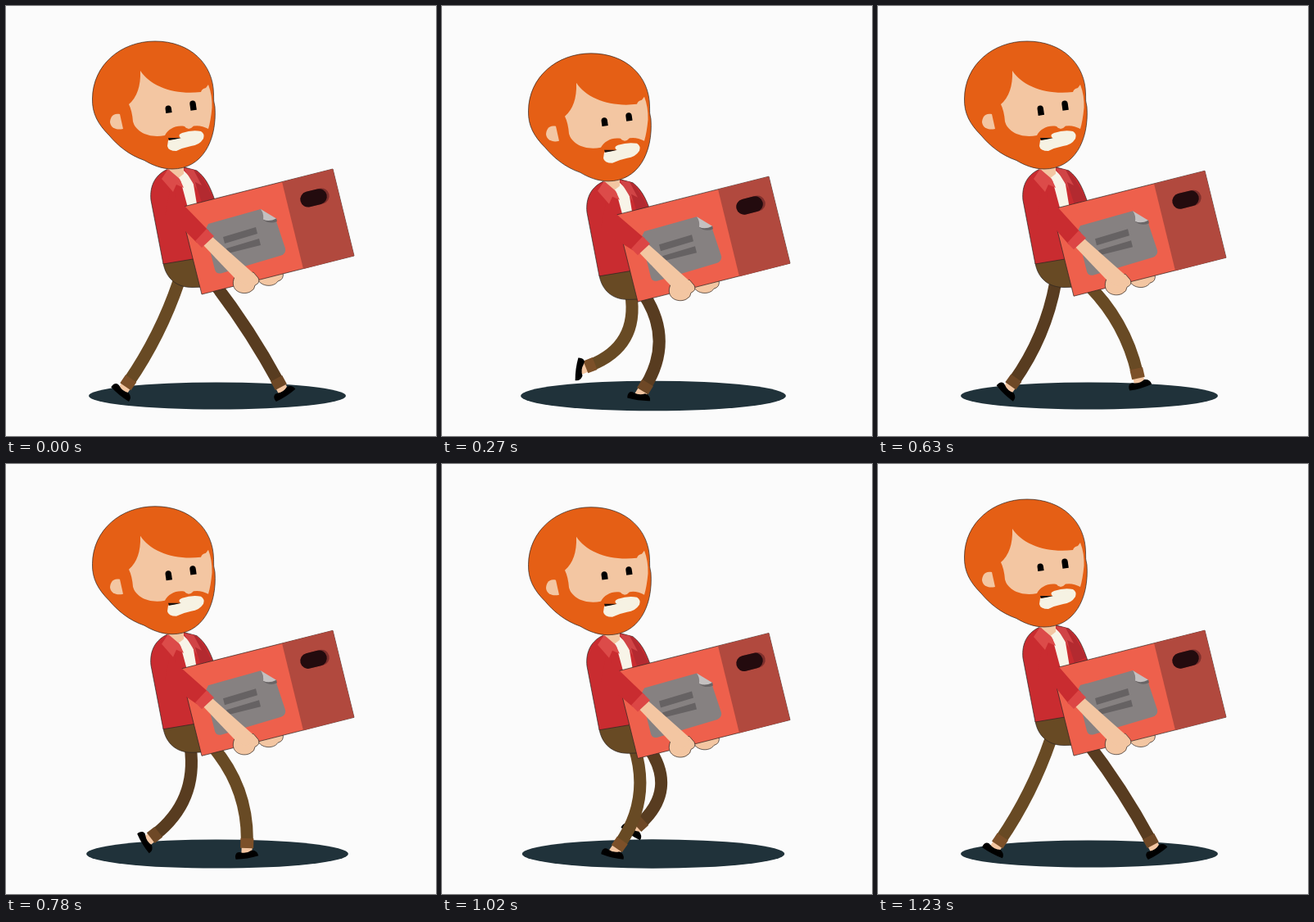
Animation of 525 by 525 pixels, one loop 1260 ms. Source, as an HTML page:

```html
<!DOCTYPE html>
<html lang="en">
<head>
<meta charset="utf-8">
<title>Carrying a box</title>
<style>
  html, body { margin: 0; width: 100%; height: 100%; overflow: hidden; background: #fbfbfb; }
  svg { display: block; width: 100vw; height: 100vh; }
  .edge { stroke: #2b2422; stroke-width: .7; }
  .skin { fill: #f3c6a2; }
  .red { fill: #c92c30; }
  .thigh { fill: none; stroke-width: 15; }
</style>
</head>
<body>
<svg viewBox="0 0 525 525">
  <ellipse id="shadow" cx="258" cy="476" fill="#20323a"/>
  <g id="farLeg"></g>
  <g id="nearLeg"></g>

  <g id="torso">
    <path class="edge" fill="#684a24" d="M192 314C195 331 207 344 228 343.5L246 343L240 305Z"/>
    <path class="red edge" d="M198 199C183 205 175 219 177 237L192 315L240 307L256 240C251 226 246 211 233 201L218 197Z"/>
    <path fill="#f8f4e8" d="M210 208L217 201L228 212L234 248L222 249Z"/>
    <path class="skin" d="M196 194H217V205L208 212L198 204Z"/>
    <path class="red" d="M205 214L213 213L223 250L210 252Z"/>
    <path fill="#dc4b49" d="M198 199L190 211L204 227L208 218L217 222L212 211Z"/>
    <path fill="#b32a30" d="M217 198L230 200C241 208 246 222 254 236L240 243L232 218Z"/>
    <path fill="#d04446" d="M217 198L229 200L239 219L231 215L233 224Z"/>
  </g>

  <g class="load">
    <path class="skin edge" d="M307 333C311 343 327 344 332 336Q340 334 338 325L308 325Z"/>
    <path class="edge" fill="#ee604c" d="M212.5 246L399 199L425 305L239 352Z"/>
    <path fill="#b1493e" d="M337 214.7L399 199L425 305L363 321Z"/>
    <g transform="rotate(-14 377 234)">
      <rect x="360" y="224.5" width="35" height="19" rx="9.5" fill="#7d2f2c"/>
      <rect x="359" y="224.5" width="33" height="19" rx="9.5" fill="#230b0e"/>
    </g>
    <path fill="#868181" d="M247 266L311 248L329 260L341 296Q342 302 336 304.5L264 326Q257 328 255 322L243 274Z"/>
    <path fill="#696566" d="M330 259L331 263Q322 267 314 261Z"/>
    <path fill="#c4c0c0" d="M311 248L330 259.5Q321 264 314 260.5Q315 253 311 248Z"/>
    <path fill="#666263" d="M265 282L305 270L307 278L267 290ZM269 296L309 284L311 292L271 302Z"/>
  </g>

  <path id="sleeve" class="red"/>
  <g class="load">
    <path class="edge" fill="#f3c6a2" d="M279 331C272 347 288 354 298 349Q304 346 304 341Q311 338 308 332L302 325Z"/>
    <path class="skin" d="M251 281L301 325.5Q305 338 291 340L280 333L240 291Z"/>
    <path fill="#dc4645" d="M245 272L254 281L239 295L231 287Z"/>
  </g>

  <g id="head">
    <path class="edge" fill="#e55f15" d="M182 43C225 43 253.5 71 253.5 108Q253 116 255 123C258 165 239 199 203 199C190 199 178 194 169 188.5C150 182 136 170 126 158C112 144 105 131 105.5 113C106 72 140 43 182 43Z"/>
    <path class="skin" d="M164 79C176 98 206 109 238 105Q239 101 244 100L247 96Q252 109 251.5 124Q250 140 247 150Q238 145 229 146.5Q226 150 223 150Q219 149 218 147C208 145 198 150 194 158C174 162 158 153 155 141Q154 128 150 120Q165 107 164 79Z"/>
    <path class="skin" d="M139 132C130 130 127 137 127 142C128 149 135 152 143 150Z"/>
    <path fill="#f6f2e3" d="M198 164L213 161Q209 157 215 155Q227 151 238 153Q243 156 241 162Q236 170 226 171Q216 173 208 177Q198 177 197 171Z"/>
    <path fill="#15100e" d="M198 161L214 161Q206 163 199 164Z"/>
    <path id="eyeL"/>
    <path id="eyeR"/>
  </g>
</svg>
<script>
const LOOP = 1260, STEP = 30, TAU = 2 * Math.PI;
const $ = id => document.getElementById(id);
const clamp = (v, lo = 0, hi = 1) => Math.min(hi, Math.max(lo, v));
const mix = (a, b, u) => a + (b - a) * u;
const smooth = u => u * u * (3 - 2 * u);

const move = (el, x, y, deg = 0) =>
  el.setAttribute('transform', `translate(${x} ${y}) rotate(${deg})`);

// Ease from 0 to 1 between a and b, then back to 0 at c.
const pulse = (t, a, b, c, back = smooth) =>
  smooth(clamp((t - a) / (b - a))) - back(clamp((t - b) / (c - b)));

// The body dips once per step; the box follows and recovers more slowly.
const bob = t => 15 * (pulse(t, 0, 260, 440) + pulse(t, 630, 900, 1200));
const sag = t => 9.2 * (pulse(t, 0, 285, 740, u => u) + pulse(t, 660, 910, 1490, u => u));

const FRONT = 333, GROUND = 460;

function makeLeg(id, color, cuff, gait) {
  const g = $(id);
  g.innerHTML = `
    <path class="thigh" stroke="${color}"/>
    <g>
      <rect class="skin" x="4" y="-6.5" width="10" height="13"/>
      <rect x="-6" y="-8" width="12" height="16" fill="${cuff}"/>
    </g>
    <path d="M-14 3.5C-15-3-11-6-7-4Q0-1 7-4.5Q14-3 14 3.5Q0 5.5-14 3.5Z"/>`;
  return { ...gait, parts: g.children };
}

const legs = [
  makeLeg('farLeg', '#583c20', '#6e4826', { start: 0, stance: 540, rear: 163, lift: 21 }),
  makeLeg('nearLeg', '#684a24', '#7c5029', { start: 660, stance: 570, rear: 149, lift: 41 })
];
const SWING = 690;

// Ankle position, lift and shoe tilt: slide back on the ground, then swing forward.
function stride({ start, stance, rear, lift }, t) {
  const s = (t - start + LOOP) % LOOP;
  if (s < stance) {
    const p = s / stance;
    return { x: mix(FRONT, rear, p), y: GROUND + 5 * Math.sin(Math.PI * p), up: 0,
      tilt: mix(-33, 28, p ** .6) };
  }
  const p = clamp((s - stance) / SWING), e = p ** 2.1;
  const up = lift * Math.sin(Math.PI * e);
  return { x: mix(rear, FRONT, e), y: GROUND - up, up,
    tilt: mix(28, -33, e) + 2 * lift * Math.sin(Math.PI * p) };
}

function drawLeg(leg, t, hipY) {
  const { x, y, up, tilt } = stride(leg, t);
  const hipX = Math.min(253, 211 + .36 * (x - 150) + .4 * up);
  const dx = x - hipX, dy = y - hipY, len = Math.hypot(dx, dy);
  // The shorter the reach, the more the knee pushes forward.
  const bend = 2 * clamp((146 - len) * .55, 3, 20) / len;
  const kx = hipX + dx / 2 + dy * bend, ky = hipY + dy / 2 - dx * bend;
  const dir = Math.atan2(y - ky, x - kx);
  const [thigh, ankle, shoe] = leg.parts;
  thigh.setAttribute('d', `M${hipX} ${hipY}Q${kx} ${ky} ${x} ${y}`);
  move(ankle, x, y, dir * 360 / TAU);
  move(shoe, x + 14 * Math.cos(dir), y + 14 * Math.sin(dir), tilt);
}

function drawEye(el, x, y, h) {
  el.setAttribute('d', `M-3.7 ${h}V4Q-3.7 0 0 0Q3.7 0 3.7 4V${h}Z`);
  move(el, x, y, -8);
}

function draw(t) {
  const d = bob(t), b = sag(t), turn = TAU * t / LOOP;
  move($('torso'), 0, d);
  move($('head'), 0, d);
  document.querySelectorAll('.load').forEach(el => move(el, 0, b));
  $('sleeve').setAttribute('d',
    `M200 ${226 + d}L216.5 ${242.5 + d}L248 ${275 + b}L233 ${289 + b}L218 ${274 + d}L194 ${256 + d}Z`);
  $('shadow').setAttribute('rx', 157 + d / 3);
  $('shadow').setAttribute('ry', 16.5 + d / 8);
  drawEye($('eyeL'), 197.7, 121.5, 10.5 - 1.5 * Math.cos(turn));
  drawEye($('eyeR'), 227.5, 115.5, 10.8 + Math.cos(2 * turn));
  legs.forEach(leg => drawLeg(leg, t, 337 + d));
}

function tick() {
  draw(Math.floor(performance.now() % LOOP / STEP) * STEP);
  requestAnimationFrame(tick);
}
tick();
</script>
</body>
</html>
```
